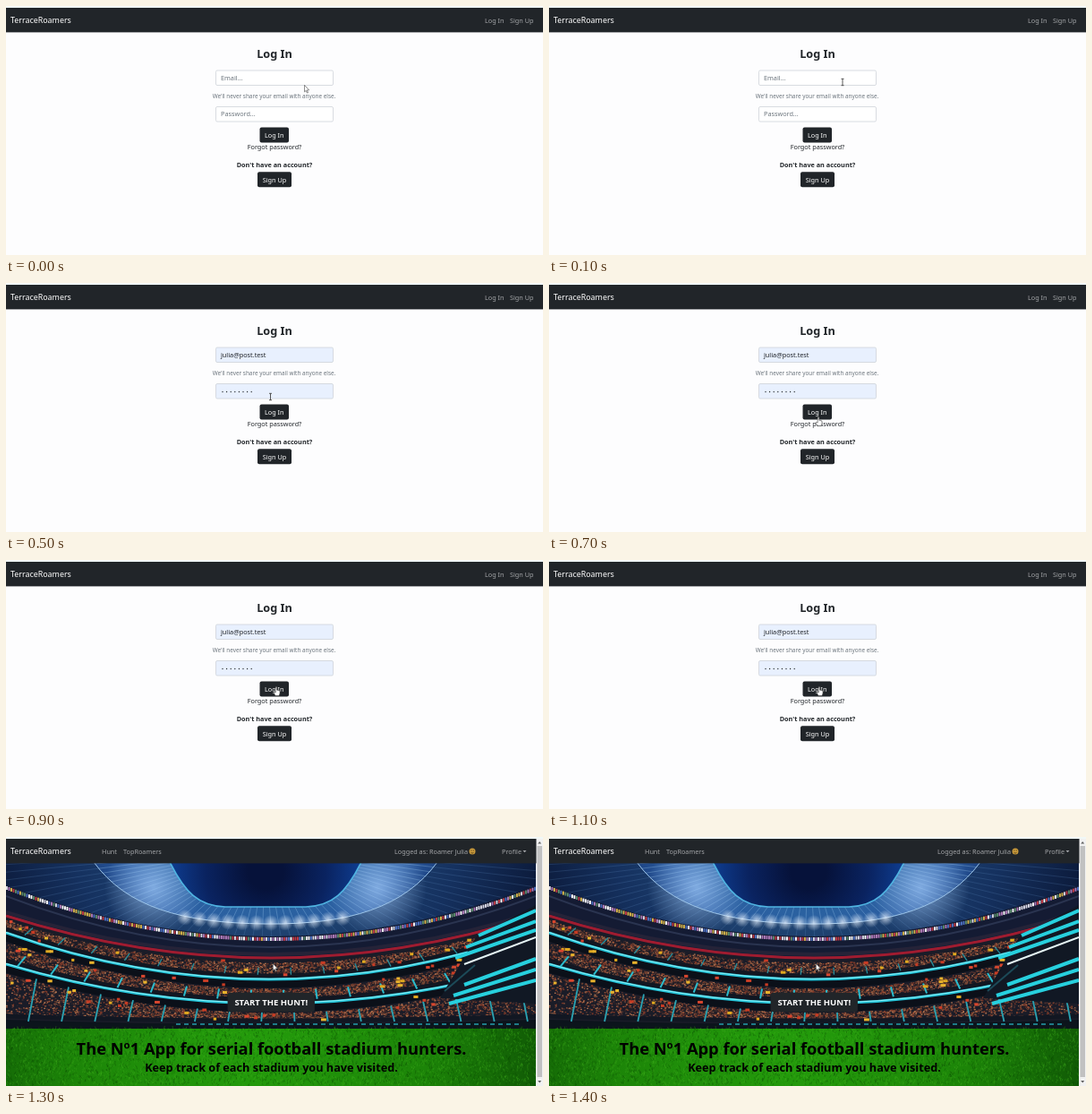
Animation, 600 px wide and 278 px high, one loop 1500 ms. Source, as an HTML page with a canvas:

```html
<!DOCTYPE html>
<html lang="en">
<head>
<meta charset="utf-8">
<style>
  html, body { margin: 0; width: 100%; height: 100%; overflow: hidden; background: #fdfdfe; }
  canvas, svg { position: absolute; left: 0; top: 0; }
  text { font: 7.27px "Noto Sans", "Open Sans", sans-serif; fill: #212529; }
  .mid { text-anchor: middle; }
  .bold { font-weight: 700; }
  .link { fill: #a3a5a8; }
  .white { fill: #fff; }
  .hint { fill: #6c757d; }
  .dark { fill: #212529; }
  .field { fill: #fff; stroke: #ced4da; stroke-width: .8; }
  .filled .field { fill: #e8f0fe; }
  .filled .empty, .typed { display: none; }
  .filled .typed { display: inline; }
</style>
</head>
<body>
<canvas id="photo" width="600" height="278"></canvas>
<svg width="600" height="278" viewBox="0 0 600 278">
  <rect width="600" height="2" fill="#f1f8f7"/>
  <rect class="dark" y="2" width="600" height="27.4"/>
  <text class="white" x="5" y="19" style="font-size:8.9px">TerraceRoamers</text>

  <g id="login">
    <text class="link" x="535" y="18.7">Log In</text>
    <text class="link" x="563" y="18.7">Sign Up</text>
    <text class="mid bold" x="300" y="58.3" style="font-size:12.7px">Log In</text>
    <rect class="field" x="234.5" y="72" width="131" height="16.5" rx="1.5"/>
    <rect class="field" x="234.5" y="112.5" width="131" height="16.5" rx="1.5"/>
    <g class="empty">
      <text class="hint" x="240" y="82.7">Email...</text>
      <text class="hint" x="240" y="123.2">Password...</text>
    </g>
    <g class="typed">
      <text x="240" y="82.7">julia@post.test</text>
      <path d="M242 121.5h33" stroke="#212529" stroke-width="1.3" stroke-linecap="round" stroke-dasharray="0 4.6"/>
    </g>
    <text class="mid hint" x="299.5" y="103" style="font-size:6.36px">We'll never share your email with anyone else.</text>
    <rect class="dark" x="283.5" y="135.5" width="32.5" height="17" rx="2"/>
    <text class="mid white" x="299.7" y="146.7">Log In</text>
    <text class="mid" x="300" y="160.3">Forgot password?</text>
    <text class="mid bold" x="300" y="180.3">Don't have an account?</text>
    <rect class="dark" x="281" y="185.3" width="38" height="17" rx="2"/>
    <text class="mid white" x="300" y="196.5">Sign Up</text>
  </g>

  <g id="home">
    <text class="link" x="107" y="18.7">Hunt</text>
    <text class="link" x="131" y="18.7">TopRoamers</text>
    <text class="link" x="434" y="18.7">Logged as: Roamer Julia</text>
    <circle cx="521" cy="16" r="3.5" fill="#c99a3c"/>
    <path d="M519.2 15h1.2M521.7 15h1.2M519.5 17.5q1.5 1.2 3 0" fill="none" stroke="#4a3514" stroke-width=".8"/>
    <text class="link" x="554" y="18.7">Profile</text>
    <path d="M577.5 15h4l-2 2.2z" fill="#a3a5a8"/>
    <rect class="dark" x="247.6" y="173.7" width="97.3" height="21.6" rx="3"/>
    <text class="mid bold white" x="296.3" y="187.7" style="font-size:9.5px">START THE HUNT!</text>
    <text class="mid bold" x="296.5" y="242.8" style="font-size:18.3px;fill:#000">The Nº1 App for serial football stadium hunters.</text>
    <text class="mid bold" x="296.5" y="262.2" style="font-size:12.7px;fill:#000">Keep track of each stadium you have visited.</text>
    <rect x="592.5" y="2" width="7.5" height="276" fill="#f1f1f1"/>
    <rect x="593.5" y="10" width="5.5" height="258" fill="#c1c1c1"/>
    <path d="M594.2 7.5h4l-2-2.5zM594.2 272h4l-2 2.5z" fill="#606060"/>
  </g>

  <path id="cursor" stroke-linejoin="round"/>
</svg>
<script>
const $ = id => document.getElementById(id);
const shapes = {
  arrow: "M0 0V7.6L1.7 6.1 2.9 8.8 4 8.3 2.8 5.6H5.1Z",
  beam: "M-1.5-3.7H1.5M0-3.7V3.7M-1.5 3.7H1.5",
  hand: "M-.8 0Q0-.9.8 0V3.2L4 4V7L3 9.6H-1L-3 6Q-3 4.6-.8 6Z"
};
// Pointer pose per 100 ms; the last one holds.
const poses = [
  [333.5, 88.3, "arrow"], [328, 85, "beam"], [323, 84, "beam"], [320.5, 87, "beam"],
  [308, 105, "beam"], [295.5, 127, "beam"], [298, 179, "beam"], [301, 150, "hand"],
  [301.5, 144, "hand"], [302, 142, "hand"], [302, 142, "hand"], [302, 142, "hand"],
  [298.3, 141.3, "arrow"]
];

function paintStadium() {
  const g = $("photo").getContext("2d"), W = 592;
  let seed = 7;
  const rnd = () => (seed = seed * 16807 % 2147483647) / 2147483647;
  const pick = list => list[rnd() * list.length | 0];
  // Sagging curve given its heights at left, middle and right.
  const ctrl = ([l, m, r]) => 2 * m - (l + r) / 2;
  const at = (c, x, u = x / W) => (1 - u) ** 2 * c[0] + 2 * u * (1 - u) * ctrl(c) + u * u * c[2];
  const shift = (c, dy) => c.map(y => y + dy);
  const trace = c => {
    g.beginPath();
    g.moveTo(0, c[0]);
    g.quadraticCurveTo(W / 2, ctrl(c), W, c[2]);
  };
  const stroke = (color, width, path) => {
    g.strokeStyle = color;
    g.lineWidth = width;
    path ? g.stroke(path) : g.stroke();
  };
  const band = (c, color, width) => {
    trace(c);
    stroke(color, width);
  };
  const below = (c, color) => {
    trace(c);
    g.lineTo(W, 216);
    g.lineTo(0, 216);
    g.fillStyle = color;
    g.fill();
  };
  const line = (x1, y1, x2, y2, color, width) => {
    g.beginPath();
    g.moveTo(x1, y1);
    g.lineTo(x2, y2);
    stroke(color, width);
  };
  const radial = (x, y, r0, r1, ...colors) => {
    const s = g.createRadialGradient(x, y, r0, x, y, r1);
    colors.forEach((c, i) => s.addColorStop(i / (colors.length - 1), c));
    return s;
  };
  const glow = (x, y, r, color) => {
    g.fillStyle = radial(x, y, 0, r, color, color.slice(0, 7) + "00");
    g.fillRect(x - r, y - r, 2 * r, 2 * r);
  };
  g.beginPath();
  g.rect(0, 29, W, 249);
  g.clip();

  // Roof trusses, glass ring and sky
  const opening = new Path2D("M183 28C200 62 215 77 245 78H335C365 77 380 62 397 28Z");
  const glass = new Path2D("M98 28C135 78 195 96 290 97S445 78 482 28Z");
  const rays = (r0, r1, color, width) => {
    for (let a = .05; a < 3.1; a += .055) {
      const c = Math.cos(a), s = Math.sin(a);
      line(290 + 1.9 * r0 * c, 12 + r0 * s, 290 + 1.9 * r1 * c, 12 + r1 * s, color, width);
    }
  };
  g.fillStyle = radial(290, -40, 110, 340, "#234a78", "#15315f", "#0a1532");
  g.fillRect(0, 29, W, 110);
  rays(75, 170, "#6f9cd044", .7);
  g.fillStyle = radial(290, -40, 110, 220, "#2a63a0", "#2c5da2", "#173a78");
  g.fill(glass);
  g.save();
  g.clip(glass);
  rays(50, 110, "#a9d2f366", .7);
  g.restore();
  glow(165, 56, 55, "#a8d0ffaa");
  glow(415, 56, 55, "#a8d0ffaa");
  g.fillStyle = radial(290, 38, 20, 115, "#06123a", "#0a2360", "#0f429a");
  g.fill(opening);
  stroke("#4fb4e2", 1.7, opening);
  stroke("#9cc4e8", 1, glass);
  for (let x = 200; x < 390; x += 16) glow(x, 96 - ((x - 290) / 36) ** 2, 9, "#eaf4ffbb");

  // Flag ring
  const flags = [57, 114, 57];
  below(shift(flags, -3), "#141b33");
  for (let x = 0; x < W; x += 2.5) {
    g.fillStyle = pick(["#d8d8e4", "#c03a44", "#d4b44a", "#4c70c0", "#fff", "#598a6a", "#b07ab8"]);
    g.fillRect(x, at(flags, x) - 2, 1.9, 4);
  }
  band(shift(flags, 9), "#2a3450", 2);

  // Stands
  const rims = [[88, 135, 88], [107, 159, 105], [142, 186, 142], [204, 209, 204]];
  rims.slice(0, 3).forEach((top, i) => {
    const bottom = rims[i + 1], gap = i ? 10 : 5;
    below(top, "#1a1c28");
    for (let n = 0; n < 4200; n++) {
      const x = rnd() * W, a = at(top, x) + gap, b = at(bottom, x) - 5;
      g.fillStyle = pick(["#75432f", "#9a553b", "#2c2328", "#b0734f", "#54332f", "#843a28", "#1f1e26"]);
      g.fillRect(x, a + rnd() * Math.max(b - a, 2), 1.7, 1.3);
    }
    band(shift(bottom, -4), "#121722", 5);
  });
  below(rims[3], "#0c141c");
  band(rims[0], "#a01c30", 3);
  band(shift(rims[0], -4), "#252338", 4);
  for (const rim of rims.slice(1, 3)) {
    band(shift(rim, 5), "#0b1019", 9);
    band(rim, "#22c3d8", 3);
    band(shift(rim, -.6), "#8eeff5", 1);
  }
  for (let x = 22; x < W; x += 36) {
    const lean = (x - 296) / 30, y = at(rims[2], x), top = at(rims[1], x);
    line(x, y - 15, x + lean, y - 4, "#2bbccd", 2);
    line(x + 12, y + 10, x + 12 + lean, 206, "#2aa2b2", 1.8);
    line(x + 8, top - 13, x + 8 + lean, top - 5, "#248e9d", 1.3);
  }
  for (let n = 0; n < 80; n++) {
    const x = (n % 2 ? rnd() : rnd() ** 2) * W, tier = pick([0, 1, 1, 2]);
    const y = at(rims[tier], x) + 3 + rnd() * 15;
    g.fillStyle = pick(["#e9b22c", "#e0a820", "#d8462e", "#c83c24"]);
    g.fillRect(x, y, 3 + rnd() * 3, 3);
  }

  // Near stand on the right
  g.beginPath();
  g.moveTo(485, 180);
  g.lineTo(525, 112);
  g.lineTo(W, 76);
  g.lineTo(W, 186);
  g.fillStyle = "#111824";
  g.fill();
  for (const [x, y, end] of [[528, 110, 82], [514, 123, 94], [502, 135, 104], [512, 165, 136], [500, 177, 148], [495, 186, 160]])
    line(x, y, W, end, "#27d0de", 4);
  line(512, 142, W, 112, "#e5f4f5", 2);
  line(490, 172, 524, 143, "#1c4a58", 2);
  g.fillStyle = "#0c151c";
  g.fillRect(0, 208, W, 7);
  for (let x = 190; x < 570; x += 9) line(x, 209, x + 5, 209, "#2495a2", 1.6);

  // Pitch
  g.fillStyle = radial(270, 232, 30, 370, "#239a0b", "#1c8408", "#0d4c05");
  g.fillRect(0, 214, W, 64);
  for (let n = 0; n < 6000; n++) {
    const x = rnd() * W, y = 214 + rnd() * 64;
    line(x, y, x + rnd() * 3 - 1.5, y - 1 - rnd() * 2.5, pick(["#0e5a0577", "#46b82266", "#0a480477", "#36a01877"]), .8);
  }
}

function draw() {
  const step = Math.floor(performance.now() % 1500 / 100);
  const [x, y, kind] = poses[Math.min(step, poses.length - 1)];
  const home = step >= 12;
  $("login").style.display = home ? "none" : "";
  $("home").style.display = home ? "" : "none";
  $("login").classList.toggle("filled", step >= 2);
  $("photo").style.visibility = step >= 13 ? "visible" : "hidden";
  const cursor = $("cursor");
  cursor.setAttribute("d", shapes[kind]);
  cursor.setAttribute("transform", `translate(${x} ${y})`);
  cursor.setAttribute("fill", kind == "beam" ? "none" : "#fff");
  cursor.setAttribute("stroke", "#444");
  cursor.setAttribute("stroke-width", kind == "beam" ? .9 : .6);
  requestAnimationFrame(draw);
}

paintStadium();
draw();
</script>
</body>
</html>
```
